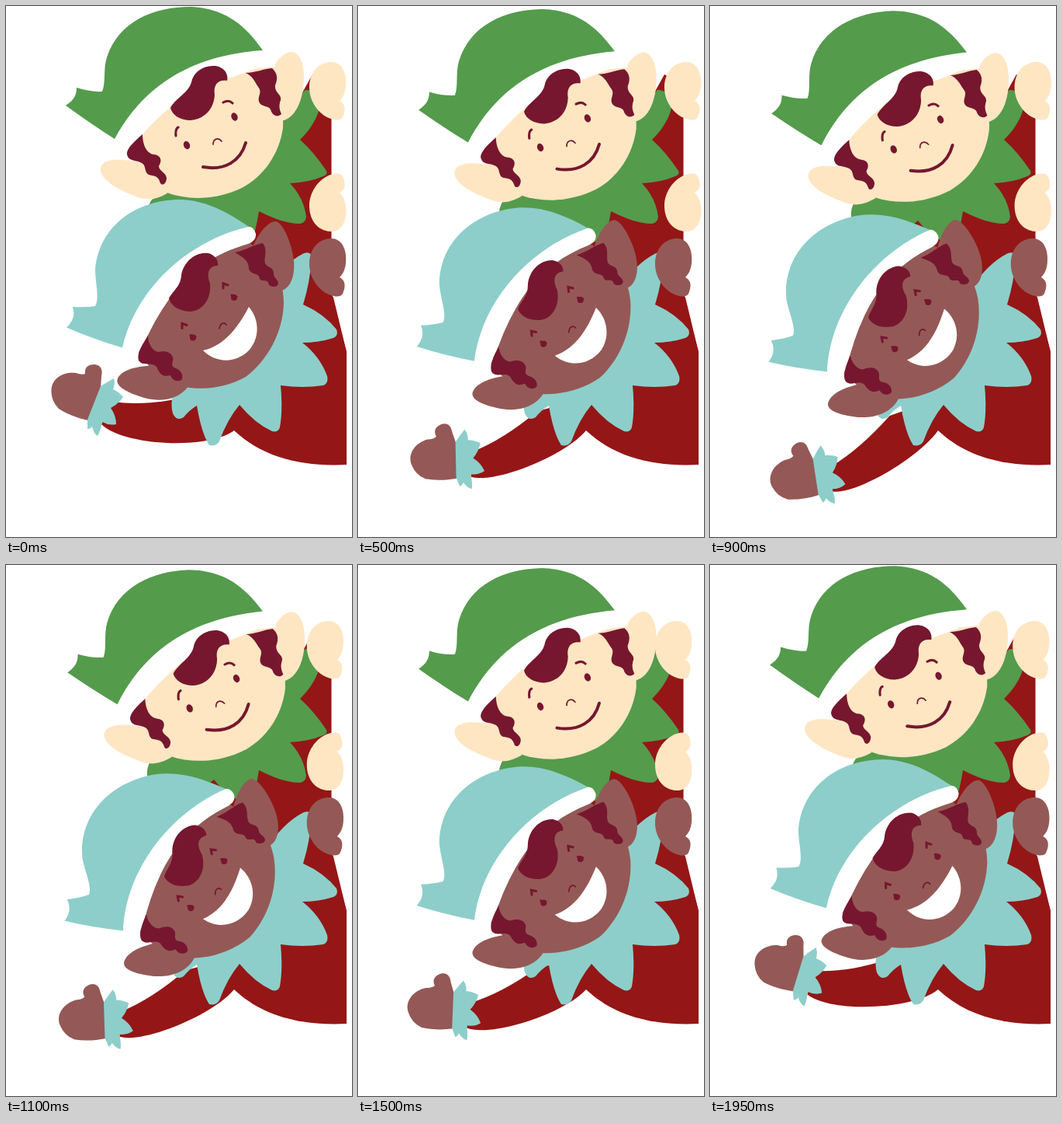
Recreate the animation shown at these times as an HTML page. Size 446x683 px, loop 2 s.

```html
<!DOCTYPE html>
<html lang="en">
<head>
<meta charset="utf-8">
<title>Two waving elves</title>
<style>
  html, body { margin: 0; width: 100%; height: 100%; overflow: hidden; background: #fff; }
  svg { display: block; width: 446px; height: 683px; }
  .green { fill: #549b4c; }
  .teal { fill: #8dceca; }
  .red { fill: #951616; }
  .fair { fill: #ffe6c3; }
  .brown { fill: #945956; }
  .white { fill: #fff; }
  .hair { fill: #76172f; }
  .line { fill: none; stroke: #76172f; stroke-width: 3.1; stroke-linecap: round; }
</style>
</head>
<body>
<svg viewBox="0 0 446 683">
  <defs>
    <path id="hand" d="M418 72C432 71 440 85 438 104C437 114 433 119 430 122C438 126 438 134 434 143C432 147 427 147 422 146C404 142 391 123 391 105C391 86 402 73 418 72Z"/>
  </defs>

  <!-- green elf -->
  <path class="red" d="M380 115L395 88L412 98L419.500 130V372L439 445V500H330L240 300L262 266Z"/>
  <path class="green" d="M182 270Q181 259 188 249L210 238L350 140L386 108Q393 108 400 113C409 122 405 146 379 172Q397 188 413 212Q415 217 409 219Q390 227 366 228Q384 247 387 271Q386 279 379 280C362 280 344 273 326 264Q322 290 316 304L300 303Q280 292 268 276L240 300H184Z"/>
  <g id="greenHead">
    <path class="fair" d="M208 241C190 251 178 250 165 244C142 235 120 222 122 208C126 195 146 197 170 200Z"/>
    <path class="fair" d="M342 85C350 66 360 59 369 59C380 61 385 78 384 95C383 120 374 145 354 148Z"/>
    <path class="fair" d="M160 180L215 120L345 72C352 95 358 130 357 157C352 191 332 219 304 234C270 250 235 250 207 240C190 228 175 210 160 180Z"/>
    <path class="white" d="M140 170C185 90 245 62 331 57Q345 58 347 78C320 80 290 83 270 90C235 108 200 138 176 165L160 187Z"/>
    <path class="green" d="M77 128C88 121 91 114 91 105Q110 111 124 110C129 98 125 82 130 66C145 20 190 1 238 1C285 3 310 27 331 57C245 63 180 97 140 171Q110 152 77 128Z"/>
    <path id="greenCurl" class="hair" d="M212 131C218 119 235 112 239 98C242 83 257 76 270 77C282 79 287 88 285 96C273 94 267 102 269 114C268 134 254 146 238 147C224 147 214 140 212 131Z"/>
    <path class="hair" d="M309 86C320 86 332 81 343 80C351 87 350 95 347 102C346 112 356 114 354 121C351 129 353 134 355 139C351 143 345 142 342 136C341 127 329 131 326 123C324 116 331 111 325 104C321 98 318 90 309 86Z"/>
    <path class="hair" d="M176 165C168 172 155 183 156 191C158 200 167 198 173 201C182 204 177 213 184 217C192 219 196 218 199 228C202 232 207 228 207 221C206 214 197 212 197 206C202 198 199 192 191 191C181 190 176 178 176 165Z"/>
    <ellipse class="hair" cx="233" cy="179" rx="4" ry="5.3" transform="rotate(-22 233 179)"/>
    <ellipse class="hair" cx="294.500" cy="142.500" rx="4" ry="5.3" transform="rotate(-22 294.500 142.500)"/>
    <path class="line" d="M219 167Q218 158 222 156M280 124Q287 120 292 125"/>
    <path class="line" style="stroke-width:1.700" d="M267 178C267 170 274 169 278 174"/>
    <path class="line" style="stroke-width:4" d="M254 207C282 212 302 200 309 176"/>
  </g>
  <g id="greenHands" class="fair">
    <use href="#hand"/>
    <use href="#hand" transform="matrix(1 0 0 -1 0 362)"/>
  </g>

  <!-- teal elf -->
  <path id="sleeve" class="red"/>
  <g id="mitten">
    <path class="brown" d="M58.500 494C59 478 75 470 90 472Q98 475 102 473C101 464 107 461 114 461C122 462 125 467 123 476L122 492L106 533C92 530 79 525 68 518Q58 508 58.500 494Z"/>
    <path class="teal" d="M122 489Q130 484 139 479Q141 486 138 493Q145 496 151 503Q145 512 135 517Q142 527 142 538Q133 540 124 535Q122 546 118 553Q113 550 111 541Q109 544 105 544V532Z"/>
  </g>
  <path class="red" d="M260 480L390 320L422 375L439 445V590C380 593 330 580 294 546Z"/>
  <path class="teal" d="M335 367Q356 332 384 318Q394 315 394 324Q392 355 383 384Q410 396 426 416Q429 424 422 427Q403 433 382 433Q405 451 414 476Q416 485 409 488Q382 492 354 488Q357 520 353 542Q351 549 343 547Q321 537 301 513Q285 532 275 560Q271 567 262 565Q252 550 246 514Q236 520 229 529Q220 535 215 524Q212 514 215 500L250 440Z"/>
  <g id="tealHead">
    <path class="brown" d="M235 489C221 509 193 510 172 502C154 496 140 488 144 479C152 464 180 462 205 462Z"/>
    <path class="brown" d="M316 315C325 291 339 276 348 277C360 280 374 321 371 340C370 354 363 365 354 366Z"/>
    <path class="brown" d="M171 446L200 374L300 295Q319 306 333 322C350 338 358 358 358 382C357 420 337 456 309 477C282 492 252 494 230 490C205 486 188 470 171 446Z"/>
    <path class="white" d="M150 439C166 365 240 298 309 284Q319 282 322 293Q323 302 312 306C270 318 238 339 211 376Q190 405 174 443Z"/>
    <path class="teal" d="M78 413.500C87 405 89 397 86 387Q102 388 115 386C121 375 115 358 115 338C120 285 165 249 225 249C260 250 288 267 313 284C240 300 168 360 150 439.500Q111 428 78 413.500Z"/>
    <path id="tealCurl" class="hair" d="M210 376C216 365 225 361 226 346C230 326 247 316 261 318C270 321 274 327 273 334C261 334 258 344 263 357C265 378 252 393 237 393C222 392 213 386 210 376Z"/>
    <path class="hair" d="M295 317C310 314 321 306 331 305C338 314 332 323 334 331C337 337 344 335 345 343C344 350 351 351 351 357C350 362 344 362 339 359C338 350 331 356 327 351C326 342 316 347 313 338C313 326 303 322 295 317Z"/>
    <path class="hair" d="M183 424C176 435 168 447 171 456C176 464 187 457 194 464C199 476 204 477 212 475C215 483 223 484 227 480C229 473 224 468 219 466C210 463 217 456 215 452C213 445 205 443 196 445C187 443 183 432 183 424Z"/>
    <g id="wink">
      <circle class="hair" cx="294" cy="375" r="4"/>
      <path class="line" d="M280 363V357L286 359M291 372L297 374"/>
    </g>
    <use href="#wink" transform="translate(-53 51.500)"/>
    <path class="line" style="stroke-width:1.700" d="M275 415C276 408 281 406 284 410"/>
    <path class="white" d="M254 443C282 437 300 412 313 387C326 402 328 425 314 442C297 460 271 460 254 443Z"/>
  </g>
  <g id="tealHand" class="brown"><use href="#hand" y="227"/></g>
</svg>

<script>
const $ = id => document.getElementById(id);
const LOOP = 2000, STEP = 50;
const SHOULDER = [301, 516];

// Linear interpolation through [time, value] keys
function track(keys, t) {
  const i = keys.findIndex(k => k[0] > t);
  const [t0, a] = keys[i - 1], [t1, b] = keys[i];
  return a + (b - a) * (t - t0) / (t1 - t0);
}

const nod = [[0, 0], [1000, 1], [2000, 0]];
const wave = [[0, 0], [667, 30.5], [1000, 30], [1333, 8], [1667, 30.5], [2000, 0]];
const greenSlide = [[0, 0], [667, 5.3], [1000, 0], [1333, -10.7], [2000, 0]];
const tealSlide = [[0, 0], [667, -10.7], [1000, 0], [1333, -10.7], [2000, 0]];

const move = (id, value) => $(id).setAttribute("transform", value);
const shift = (id, x, y = 0) => move(id, `translate(${x} ${y})`);
const turn = (id, deg, x, y) => move(id, `rotate(${-deg} ${x} ${y})`);

// Point swung around the shoulder, counterclockwise
function swing(x, y, deg) {
  const a = deg * Math.PI / 180, [cx, cy] = SHOULDER;
  const dx = x - cx, dy = y - cy, c = Math.cos(a), s = Math.sin(a);
  return `${cx + dx * c + dy * s} ${cy - dx * s + dy * c} `;
}

function draw(t) {
  const k = track(nod, t), a = track(wave, t);
  turn("greenHead", 1.95 * k, 410, 60);
  turn("tealHead", 11.5 * k, 321, 449);
  // The front curls lag a little behind the heads
  shift("greenCurl", 1.5 * k, 3 * k);
  shift("tealCurl", 5 * k, 5 * k);
  turn("mitten", a, ...SHOULDER);
  shift("greenHands", track(greenSlide, t));
  shift("tealHand", track(tealSlide, t));
  // The shoulder stays put while the wrist swings
  $("sleeve").setAttribute("d",
    "M" + swing(123, 538, a) +
    "C" + swing(150, 565, a * .9) + swing(258, 572, a * .4) + "294 546" +
    "L310 500L" + swing(232, 503, a * .65) +
    "Q" + swing(180, 515, a * .9) + swing(138, 509, a) + "Z");
}

function frame() {
  draw(Math.floor(performance.now() % LOOP / STEP) * STEP);
  requestAnimationFrame(frame);
}
frame();
</script>
</body>
</html>
```
